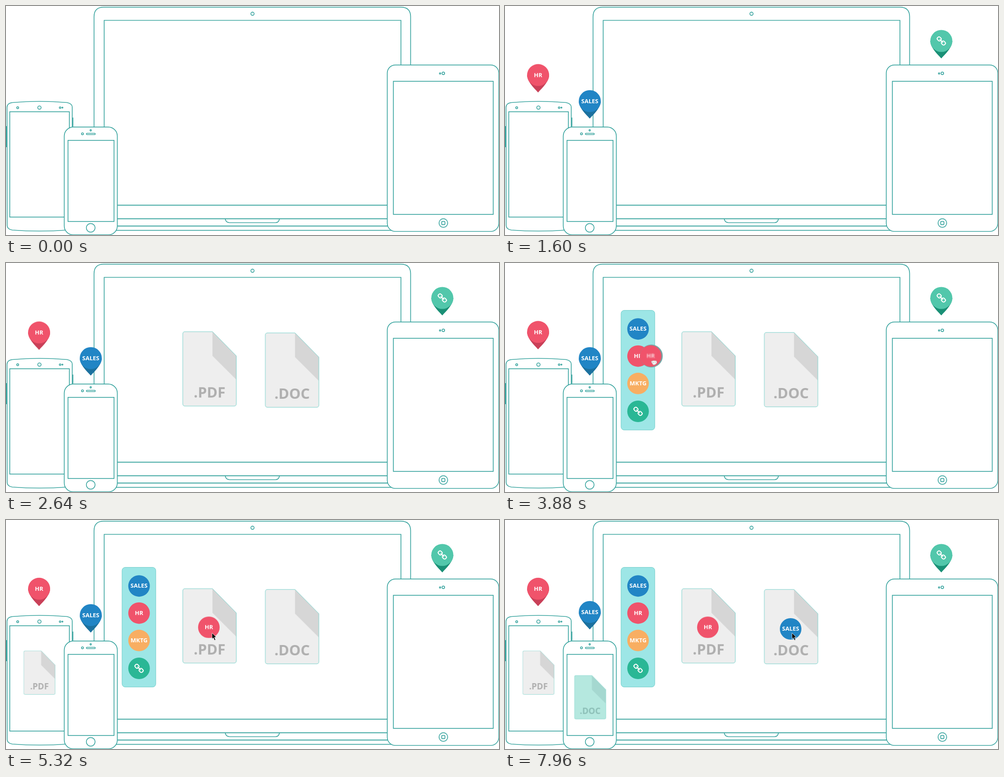
An HTML page that plays this animation: 1096 px wide and 511 px high, repeating every 8 s.

```html
<!DOCTYPE html>
<html lang="en">
<head>
<meta charset="utf-8">
<title>Share files to devices</title>
<style>
  @property --f { syntax: "<number>"; inherits: false; initial-value: 0; }

  html, body { margin: 0; width: 100%; height: 100%; overflow: hidden; background: #fff; }
  svg { display: block; width: 1096px; height: 511px; }
  text { font: bold 13px "Open Sans", sans-serif; fill: #fff; text-anchor: middle; }
  .ext { font-size: 32px; fill: #afafaf; }
  .line { fill: none; stroke: #3ba5a0; stroke-width: 1.7; }
  .body { fill: #fff; }
  .icon { fill: none; stroke: #fff; stroke-width: 2.1; stroke-linecap: round; }
  .matte { fill: #4dddc6; }
  .edge { fill: none; stroke: #74cfc9; stroke-width: 1; vector-effect: non-scaling-stroke; }

  .anim { animation: 8s linear infinite; }

  /* Pins drop in, then hop when a file arrives */
  #pin-sales { animation-name: pin-sales; }
  #pin-hr { animation-name: pin-hr; }
  #pin-link { animation-name: pin-link; }
  @keyframes pin-sales {
    0% { opacity: 0; transform: translateY(-19px); animation-timing-function: ease-in; }
    2% { opacity: 1; }
    3.5% { transform: translateY(9px); animation-timing-function: ease-in-out; }
    6% { transform: translateY(-3px); animation-timing-function: ease-in-out; }
    8.5%, 97.6% { transform: none; animation-timing-function: ease-out; }
    99.5%, 100% { opacity: 1; transform: translateY(-7px); }
  }
  @keyframes pin-hr {
    0%, 1.5% { opacity: 0; transform: translateY(-19px); animation-timing-function: ease-in; }
    3.5% { opacity: 1; }
    5% { transform: translateY(9px); animation-timing-function: ease-in-out; }
    7.5% { transform: translateY(-3px); animation-timing-function: ease-in-out; }
    10% { transform: none; }
    20% { transform: translateY(.7px); }
    33% { transform: translateY(1.6px); }
    48.5% { transform: translateY(.5px); }
    60% { transform: none; animation-timing-function: ease-out; }
    62% { transform: translateY(-7px); }
    63.2% { transform: translateY(-6.5px); animation-timing-function: ease-in-out; }
    66%, 100% { opacity: 1; transform: none; }
  }
  @keyframes pin-link {
    0%, 3% { opacity: 0; transform: translateY(-19px); animation-timing-function: ease-in; }
    5% { opacity: 1; }
    6.7% { transform: translateY(8px); animation-timing-function: ease-in-out; }
    11.5% { transform: translateY(-3px); animation-timing-function: ease-in-out; }
    14%, 100% { opacity: 1; transform: none; }
  }

  /* Files rise while they fade in over a teal backing */
  #pdf-big { animation-name: pdf-big; }
  #pdf-big .fade { animation-name: pdf-big-fade; }
  #doc-big { animation-name: doc-big; }
  #doc-big .fade { animation-name: doc-big-fade; }
  #pdf-small { animation-name: pdf-small; }
  #pdf-small .fade { animation-name: pdf-small-fade; }
  #doc-small { animation-name: doc-small; }
  #doc-small .fade { animation-name: doc-small-fade; }
  @keyframes pdf-big {
    0%, 21.3% { opacity: 0; transform: translateY(38px); }
    21.31% { opacity: 1; transform: translateY(38px); animation-timing-function: ease-out; }
    31.5%, 100% { opacity: 1; transform: none; }
  }
  @keyframes pdf-big-fade { 0%, 21% { opacity: 0; } 24.5%, 100% { opacity: 1; } }
  @keyframes doc-big {
    0%, 23.7% { opacity: 0; transform: translateY(38px); }
    23.71% { opacity: 1; transform: translateY(38px); animation-timing-function: ease-out; }
    33% { transform: translateY(1px); }
    40%, 100% { opacity: 1; transform: none; }
  }
  @keyframes doc-big-fade { 0%, 23.4% { opacity: 0; } 27%, 100% { opacity: 1; } }
  @keyframes pdf-small {
    0%, 60.2% { opacity: 0; transform: translateY(23px); }
    60.21% { opacity: 1; transform: translateY(23px); animation-timing-function: cubic-bezier(.455, .03, .515, .955); }
    66.25%, 100% { opacity: 1; transform: none; }
  }
  @keyframes pdf-small-fade { 0%, 60% { opacity: 0; } 63%, 100% { opacity: 1; } }
  @keyframes doc-small {
    0%, 97.8% { opacity: 0; transform: translateY(4px); }
    97.81% { opacity: 1; transform: translateY(4px); animation-timing-function: ease-in; }
    99.5%, 100% { opacity: 1; transform: none; }
  }
  @keyframes doc-small-fade { 0%, 97.6% { opacity: 0; } 99.5%, 100% { opacity: .65; } }

  #panel { animation-name: panel; }
  @keyframes panel { 0%, 34% { opacity: 0; } 38.5%, 100% { opacity: 1; } }

  /* Dragged tags follow a parabola driven by --f */
  .drag { transform: translate(calc(var(--dx) * var(--f)), calc(var(--b) * var(--f) + var(--a) * var(--f) * var(--f))); }
  #drag-hr { --dx: 155px; --b: -6.7px; --a: 38.7px; animation-name: drag-hr; }
  #drag-sales { --dx: 339px; --b: -48px; --a: 144px; animation-name: drag-sales; }
  #drag-hr .held { animation-name: held-hr; }
  #drag-sales .held { animation-name: held-sales; }
  #drag-hr .label { animation-name: label-hr; }
  #drag-sales .label { animation-name: label-sales; }
  @keyframes drag-hr {
    0%, 45.3% { --f: 0; opacity: 0; }
    45.31% { --f: 0; opacity: 1; animation-timing-function: cubic-bezier(.37, 0, .63, 1); }
    56.75%, 100% { --f: 1; opacity: 1; }
  }
  @keyframes drag-sales {
    0%, 74.66% { --f: 0; opacity: 0; }
    74.67% { --f: 0; opacity: 1; animation-timing-function: cubic-bezier(.37, 0, .63, 1); }
    94.66%, 100% { --f: 1; opacity: 1; }
  }
  @keyframes held-hr { 0%, 56.7% { opacity: 1; } 56.75%, 100% { opacity: 0; } }
  @keyframes held-sales { 0%, 94.6% { opacity: 1; } 94.66%, 100% { opacity: 0; } }
  @keyframes label-hr {
    0%, 56.7% { opacity: .75; filter: blur(.9px); }
    56.75%, 100% { opacity: 1; filter: none; }
  }
  @keyframes label-sales {
    0%, 94.6% { opacity: .75; filter: blur(.9px); }
    94.66%, 100% { opacity: 1; filter: none; }
  }

  #cursor { animation-name: cursor; }
  @keyframes cursor {
    0%, 42.4% { opacity: 0; transform: translate(310px, 250px); }
    42.5% { opacity: 1; transform: translate(310px, 250px); animation-timing-function: ease-in-out; }
    45.3% { opacity: 1; transform: translate(303px, 220px); }
    45.31% { opacity: 0; transform: translate(303px, 220px); }
    56.74% { opacity: 0; transform: translate(458px, 252px); }
    56.75%, 71.5% { opacity: 1; transform: translate(458px, 252px); animation-timing-function: ease-in-out; }
    75% { opacity: 1; transform: translate(299px, 156px); }
    75.01% { opacity: 0; transform: translate(299px, 156px); }
    94.65% { opacity: 0; transform: translate(638px, 252px); }
    94.66%, 100% { opacity: 1; transform: translate(638px, 252px); }
  }
</style>
</head>
<body>
<svg viewBox="0 0 1096 511" xmlns="http://www.w3.org/2000/svg">
  <defs>
    <path id="drop" d="M-24.5 0C-24.5 15-8 30 0 39C8 30 24.5 15 24.5 0Z"/>
    <path id="outline" d="M5 0H66L119 54V161Q119 166 114 166H5Q0 166 0 161V5Q0 0 5 0Z"/>
    <g id="sheet">
      <use href="#outline" fill="#eee"/>
      <path d="M66 0V54L119 107V54Z" fill="#d6d6d6"/>
    </g>
    <g id="pdf"><use href="#sheet"/><text class="ext" x="59.5" y="146.5">.PDF</text></g>
    <g id="doc"><use href="#sheet"/><text class="ext" x="59.5" y="146.5">.DOC</text></g>
    <g id="chain" class="icon" transform="rotate(45)">
      <rect x="-11" y="-3.8" width="9" height="7.6" rx="3"/>
      <rect x="2" y="-3.8" width="9" height="7.6" rx="3"/>
      <path d="M-4.5 0H4.5"/>
    </g>
    <g id="grip">
      <path d="M-6 -3Q-1 -6 6 -4L7 0Q4 5 -1 5L-4 1Z" fill="#f4f4f4" stroke="#aaa" stroke-width=".7"/>
      <path d="M-3 -1L0 0M2 -2L4 0" stroke="#999"/>
    </g>
  </defs>

  <!-- Laptop -->
  <g class="line">
    <path d="M195.7 272V24Q195.7 2.7 217 2.7H878Q899.5 2.7 899.5 24V133M218.3 272V32H878V133"/>
    <circle cx="548" cy="17.3" r="3.6"/>
    <path d="M246 444.5H848M246 474.7H848M246 491H850" stroke-width="2"/>
    <path d="M244 500.7H859"/>
    <path d="M487.3 475Q489 483.5 497 483.5H599Q606.500 483.500 608 475"/>
  </g>

  <!-- Tablet -->
  <g class="line">
    <rect class="body" x="847.6" y="131.7" width="248" height="371.3" rx="18"/>
    <rect x="861.2" y="168" width="222" height="297"/>
    <circle cx="965" cy="150.600" r="1.500"/>
    <circle cx="972.200" cy="150.300" r="2.900"/>
    <circle cx="972.300" cy="484.300" r="9.600"/>
    <rect x="968.600" y="480.700" width="7.200" height="7.200" rx="2"/>
  </g>

  <!-- Large phone -->
  <g class="line">
    <path class="body" d="M2.300 226Q2.500 217 14 215.500Q74 210 136 215.500Q147.300 218 147.300 226V490Q147 498 136 500Q74 504.500 14 500Q2.800 498 2.600 490Z"/>
    <rect x="8.400" y="236" width="132.400" height="235"/>
    <circle cx="26" cy="227" r="2.200"/>
    <circle cx="74.300" cy="226.700" r="3.700"/>
    <circle cx="120.300" cy="226.800" r="1.800"/>
    <circle cx="125.500" cy="226.800" r="1.100"/>
    <path d="M148.500 249V269M1 268V315" stroke-width="2.200"/>
  </g>

  <!-- Small phone -->
  <g class="line">
    <rect class="body" x="129.500" y="270.200" width="118" height="240.500" rx="20"/>
    <rect x="137.800" y="299.800" width="102.400" height="181"/>
    <circle cx="188.300" cy="277.500" r="1.600"/>
    <circle cx="170" cy="285.200" r="2.200"/>
    <rect x="178.700" y="284" width="19.800" height="3" rx="1.500"/>
    <circle cx="188.300" cy="495" r="9.700"/>
  </g>

  <!-- Pins -->
  <g transform="translate(73.600 153.300)"><g id="pin-hr" class="anim">
    <use href="#drop" fill="#c94058"/><circle r="24.500" fill="#f0536b"/><text y="4.700">HR</text>
  </g></g>
  <g transform="translate(188.500 212.200)"><g id="pin-sales" class="anim">
    <use href="#drop" fill="#1c719f"/><circle r="24.500" fill="#2185c5"/><text y="4.700">SALES</text>
  </g></g>
  <g transform="translate(970 78)"><g id="pin-link" class="anim">
    <use href="#drop" fill="#1a9076"/><circle r="24.500" fill="#52c7ab"/><use href="#chain"/>
  </g></g>

  <!-- Files -->
  <g transform="translate(393 153.200)"><g id="pdf-big" class="anim">
    <use href="#outline" class="matte"/><use href="#pdf" class="fade anim"/><use href="#outline" class="edge"/>
  </g></g>
  <g transform="translate(576.500 155)"><g id="doc-big" class="anim">
    <use href="#outline" class="matte"/><use href="#doc" class="fade anim"/><use href="#outline" class="edge"/>
  </g></g>
  <g transform="translate(39.500 292)"><g id="pdf-small" class="anim"><g transform="scale(.586)">
    <use href="#outline" class="matte"/><use href="#pdf" class="fade anim"/><use href="#outline" class="edge"/>
  </g></g></g>
  <g transform="translate(154.500 346.800)"><g id="doc-small" class="anim"><g transform="scale(.586)">
    <use href="#outline" class="matte"/><use href="#doc" class="fade anim"/><use href="#outline" class="edge"/>
  </g></g></g>

  <!-- Tag panel -->
  <g id="panel" class="anim">
    <rect x="258" y="105.700" width="75" height="267" rx="7" fill="#9de6e6" stroke="#6ccbc7"/>
    <g transform="translate(295.800 147.200)"><circle r="24" fill="#2185c5"/><text y="4">SALES</text></g>
    <g transform="translate(295.800 207.700)"><circle r="24" fill="#f0536b"/><text y="4">HR</text></g>
    <g transform="translate(295.800 268.800)"><circle r="24" fill="#f8ae62"/><text y="4">MKTG</text></g>
    <g transform="translate(295.800 331)"><circle r="24" fill="#2ab795"/><use href="#chain"/></g>
  </g>

  <!-- Dragged tags -->
  <g transform="translate(296 207.500)"><g id="drag-hr" class="drag anim">
    <circle class="held anim" cx="1.500" r="25.500" fill="#6fa5a3"/>
    <circle r="24" fill="#f0536b"/>
    <text class="label anim" y="4">HR</text>
    <g class="held anim"><use href="#grip" x="7" y="15"/></g>
  </g></g>
  <g transform="translate(296 147)"><g id="drag-sales" class="drag anim">
    <circle class="held anim" cx="13.500" r="0"/>
    <circle class="held anim" cx=".500" r="26.300" fill="#3fa9b5"/>
    <circle r="24" fill="#2185c5"/>
    <text class="label anim" y="4">SALES</text>
    <g class="held anim"><use href="#grip" x="4" y="12"/></g>
  </g></g>

  <g id="cursor" class="anim">
    <path d="M0 0V13.500L3 10.700L5.500 16.500L8 15.400L5.500 9.800H9.700Z" stroke="#fff" stroke-width=".8"/>
  </g>
</svg>
</body>
</html>
```
